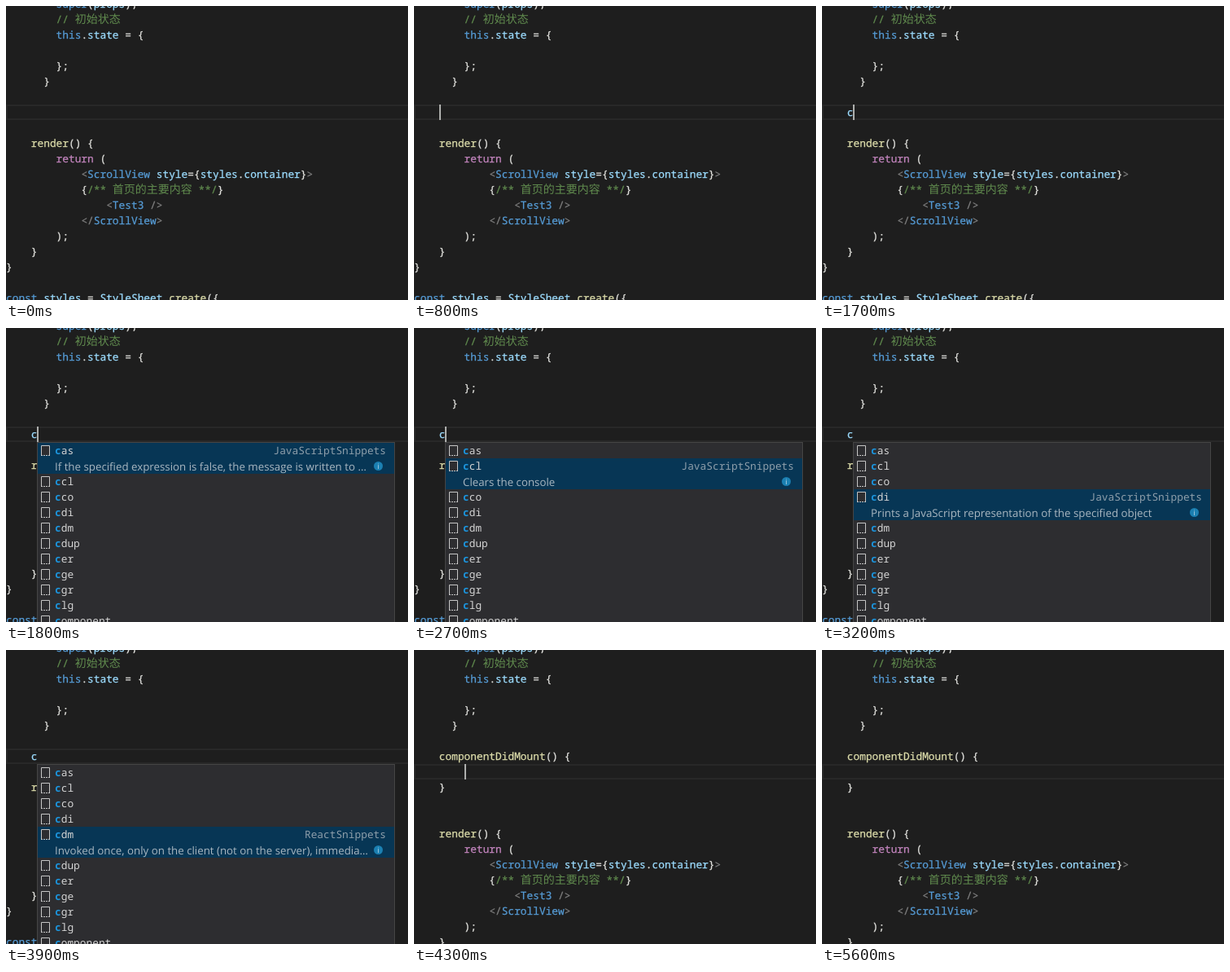
Animation, 494 px wide and 361 px high, one loop 6100 ms. Source, as an HTML page:

```html
<!DOCTYPE html>
<html lang="en">
<head>
<meta charset="utf-8">
<title>Snippet completion</title>
<style>
html, body { margin: 0; width: 100%; height: 100%; overflow: hidden; background: #1e1e1e; }
body { position: relative; color: #d4d4d4; font: 12.83px/19px "Noto Sans Mono", monospace; text-rendering: geometricPrecision; }
pre { position: absolute; left: 0; top: -12px; margin: 0; font: inherit; color: #e2e2de; -webkit-text-stroke: .25px; }
pre i { font-style: normal; }
.key { color: #569cd6; }
.var { color: #9cdcfe; }
.fn { color: #dcdcaa; }
.ctl { color: #c586c0; }
.tag { color: #808080; }
.note { color: #608b4e; }
.han { font: 14px/0 "Noto Sans CJK SC", "Noto Sans CJK", sans-serif; -webkit-text-stroke: 0; }
#line { position: absolute; left: 0; width: 100%; height: 19px; box-sizing: border-box; border: 2px solid #282828; border-right: 0; }
#caret { position: absolute; width: 2px; height: 19px; background: #aeafad; }
#list { position: absolute; left: 38px; top: 140px; width: 438px; height: 240px; border: 1px solid #454545; background: #2d2d30; }
.row { position: relative; height: 19px; padding-left: 21px; }
.row.on { height: 38px; background: #073655; }
.row b { color: #1c94dc; }
.row svg { position: absolute; left: 4px; top: 3px; fill: #2d2d30; stroke: #c5c5c5; }
.pack, .about, .info { position: absolute; display: none; }
.on > * { display: block; }
.pack { right: 10px; top: 0; color: #8e9fab; }
.about { left: 21px; top: 20px; width: 387px; overflow: hidden; white-space: nowrap; text-overflow: ellipsis; color: #a9b7c1; font: 13.3px/19px "Open Sans", sans-serif; }
.info { left: 413px; top: 23px; width: 11px; height: 11px; border-radius: 50%; background: #1b80b2; color: #c4dcea; font: 9px/11px "Open Sans", sans-serif; text-align: center; }
</style>
</head>
<body>
<div id="line"></div>
<pre>        <i class="key">super</i>(<i class="var">props</i>);
        <i class="note">// <i class="han">初始状态</i></i>
        <i class="key">this</i>.<i class="var">state</i> = {

        };
      }

    <span id="typed"></span>

    <i class="fn">render</i>() {
        <i class="ctl">return</i> (
            <i class="tag">&lt;</i><i class="key">ScrollView</i> <i class="var">style</i>={<i class="var">styles</i>.<i class="var">container</i>}<i class="tag">&gt;</i>
            {<i class="note">/** <i class="han">首页的主要内容</i> **/</i>}
                <i class="tag">&lt;</i><i class="key">Test3</i> <i class="tag">/&gt;</i>
            <i class="tag">&lt;/</i><i class="key">ScrollView</i><i class="tag">&gt;</i>
        );
    }
}

<i class="key">const</i> <i class="var">styles</i> = <i class="var">StyleSheet</i>.<i class="fn">create</i>({</pre>
<div id="caret"></div>
<div id="list"></div>
<script>
const LOOP = 6100, POPUP = 1800, TYPED = 1700, ACCEPTED = 4300;
const blinks = [800, 1300, 1700, 2100, 2500, 3000, 3400, 3900, 4300, 4700, 5100, 5600];
const picks = [POPUP, 2700, 3000, 3200, 3500];
const names = "cas ccl cco cdi cdm cdup cer cge cgr clg component".split(" ");
const abouts = [
  "If the specified expression is false, the message is written to the console",
  "Clears the console",
  "Writes the number of times that count() has been invoked at the same line",
  "Prints a JavaScript representation of the specified object",
  "Invoked once, only on the client (not on the server), immediately after the initial rendering"
];
const texts = [
  "",
  '<i class="var">c</i>',
  '<i class="fn">componentDidMount</i>() {\n\n    }\n'
];
const [line, typed, caret, list] = ["line", "typed", "caret", "list"].map(id => document.getElementById(id));

list.innerHTML = names.map((name, i) => `<div class="row">
  <svg width="12" height="13"><path d="M.5 12V.5H10.5V12"/><path d="M0 12.5H11" stroke-dasharray="2 1"/></svg>
  <span><b>c</b>${name.slice(1)}</span>
  <span class="pack">${i < 4 ? "JavaScript" : "React"}Snippets</span>
  <span class="about">${abouts[i] || ""}</span><span class="info">i</span></div>`).join("");

const passed = (times, t) => times.filter(at => t >= at).length;
let shown = -1;

function draw() {
  const t = performance.now() % LOOP;
  const stage = passed([TYPED, ACCEPTED], t);
  if (stage !== shown) typed.innerHTML = texts[shown = stage];
  line.style.top = caret.style.top = (stage === 2 ? 140 : 121) + "px";
  caret.style.left = [31, 38, 62][stage] + "px";
  caret.hidden = passed(blinks, t) % 2 === 0;
  list.hidden = t < POPUP || t >= ACCEPTED;
  const pick = passed(picks, t) - 1;
  [...list.children].forEach((row, i) => row.classList.toggle("on", i === pick));
  requestAnimationFrame(draw);
}
draw();
</script>
</body>
</html>
```
